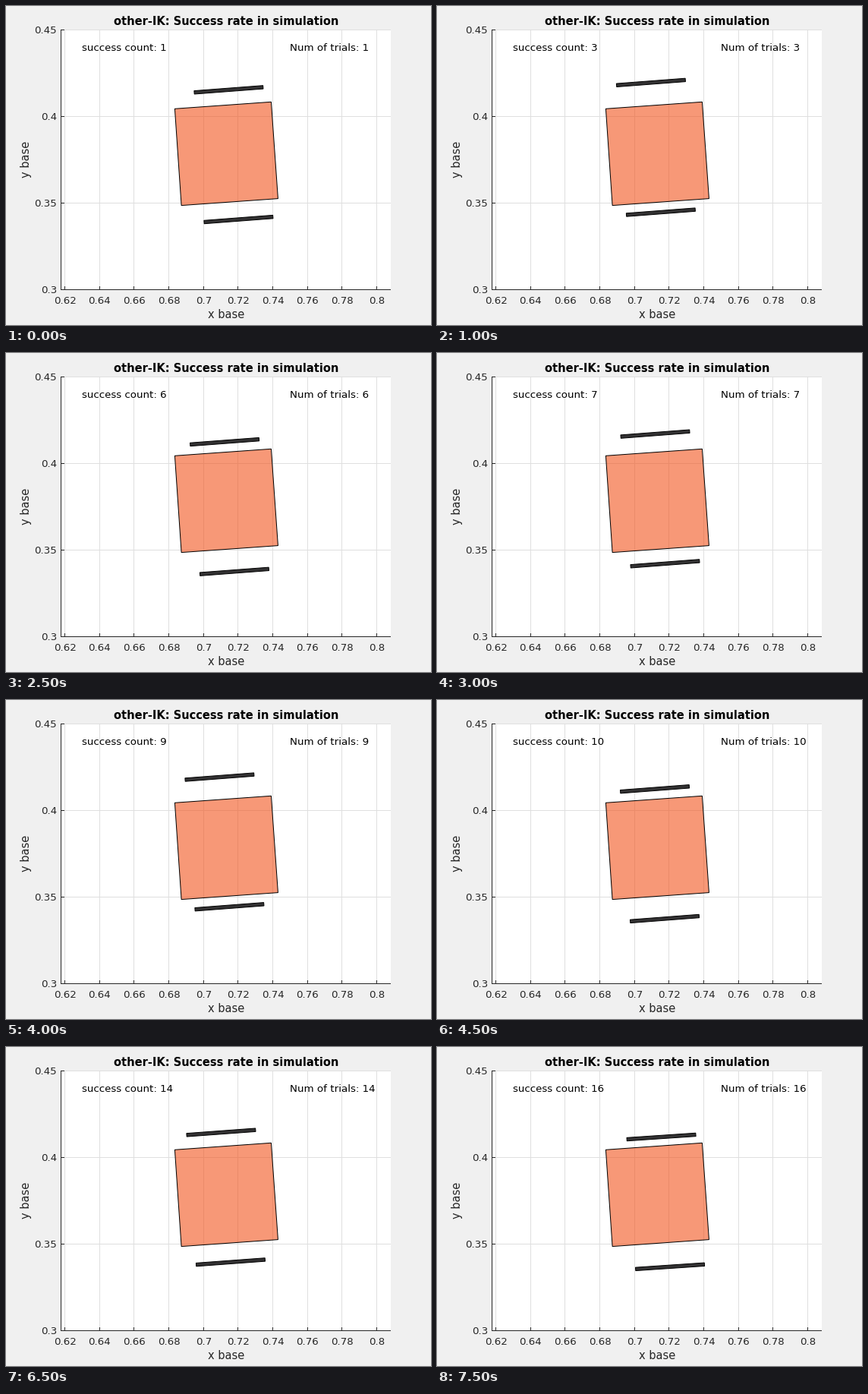
Animation of 560 by 420 pixels, one loop 8 s. Source, as a matplotlib script:

```python
import numpy as np
import matplotlib.pyplot as plt
from matplotlib.animation import FuncAnimation
from matplotlib.patches import Polygon, Rectangle

W, H, DPI = 560, 420, 100
PX = 72 / DPI                      # one pixel in points
LEFT, RIGHT, TOP, BOTTOM = 72.5, 506.8, 31.5, 373.5
INK = (0.15, 0.15, 0.15)
SMALL, LARGE = 13.33 * PX, 14.67 * PX

# Gripper pose per trial: centre x, centre y (pixels), tilt (degrees)
POSES = [
    (299.9, 195.7, 4.35), (295.0, 202.6, 4.35), (288.4, 186.2, 4.35),
    (292.5, 192.6, 4.35), (295.5, 189.0, 4.35), (294.5, 202.4, 4.30),
    (294.0, 192.0, 4.35), (292.5, 198.6, 4.35), (287.9, 186.9, 4.35),
    (293.5, 202.6, 4.35), (295.0, 207.4, 4.35), (295.5, 194.3, 4.80),
    (293.0, 190.0, 4.35), (289.7, 197.9, 4.20), (294.5, 200.6, 4.20),
    (301.3, 203.9, 3.85),
]
REACH, BAR_LEN, BAR_THICK = 85.6, 91.0, 4.4

plt.rcParams["font.family"] = "DejaVu Sans"
fig = plt.figure(figsize=(W / DPI, H / DPI), dpi=DPI, facecolor="#f0f0f0")
ax = fig.add_axes([0, 0, 1, 1])
ax.set_xlim(0, W)
ax.set_ylim(H, 0)
ax.axis("off")


def line(x0, y0, x1, y1, color, z):
    ax.plot([x0, x1], [y0, y1], color=color, lw=PX, snap=False,
            solid_capstyle="butt", zorder=z)


def label(x, y, s, size=SMALL, ha="center", color=INK, **kw):
    return ax.text(x, y, s, fontsize=size, ha=ha, va="baseline",
                   color=color, zorder=6, **kw)


def block(points, face, z):
    shape = Polygon(points, closed=True, facecolor=face, edgecolor="black",
                    lw=PX, joinstyle="miter", snap=False, zorder=z)
    return ax.add_patch(shape)


def bar_corners(cx, cy, tilt, side):
    a = np.radians(tilt)
    along = np.array([np.cos(a), -np.sin(a)])
    across = np.array([np.sin(a), np.cos(a)])
    mid = np.array([cx, cy]) + side * REACH * across
    return [mid + u * BAR_LEN / 2 * along + v * BAR_THICK / 2 * across
            for u, v in ((-1, -1), (1, -1), (1, 1), (-1, 1))]


# Plot area, grid, ticks and axes
ax.add_patch(Rectangle((72, 31), 435, 343, facecolor="white", lw=0,
                       snap=False, zorder=0))
GRID = (0.873, 0.873, 0.873)
for k in range(10):
    x = 77.4 + 45.67 * k
    px = np.floor(x) + 0.5
    line(px, 31, px, 374, GRID, 1)
    line(px, BOTTOM - 4.5, px, BOTTOM, INK, 5)
    label(x + 0.3, 392, f"{0.62 + 0.02 * k:.2f}".rstrip("0"))
for k in range(4):
    y = TOP + 114.1 * k
    py = np.floor(y) + 0.5
    line(72, py, 507, py, GRID, 1)
    line(LEFT, py, LEFT + 4.5, py, INK, 5)
    label(67, np.floor(y) + 5, f"{0.45 - 0.05 * k:.2f}".rstrip("0"), ha="right")
line(LEFT, 31, LEFT, 374, INK, 5)
line(72, BOTTOM, 507, BOTTOM, INK, 5)

label(289.8, 25, "other-IK: Success rate in simulation", LARGE,
      color="black", weight="bold")
label(290, 411, "x base", LARGE)
label(31, 202, "y base", LARGE, rotation=90, rotation_mode="anchor")

# Target box and gripper fingers
block([(222.4, 135.3), (349.4, 126.3), (358.4, 253.6), (231.1, 262.6)],
      (0.95, 0.325, 0.11, 0.6), 3)
fingers = [(side, block([(0, 0)] * 4, "#333233", 4)) for side in (-1, 1)]
success = label(100.2, 59, "", ha="left", color="black")
trials = label(374.3, 59, "", ha="left", color="black")


def update(i):
    for side, bar in fingers:
        bar.set_xy(bar_corners(*POSES[i], side))
    success.set_text(f"success count: {i + 1}")
    trials.set_text(f"Num of trials: {i + 1}")
    return [bar for _, bar in fingers] + [success, trials]


anim = FuncAnimation(fig, update, frames=len(POSES), interval=500,
                     repeat=True, repeat_delay=0, blit=False)
plt.show()
```
